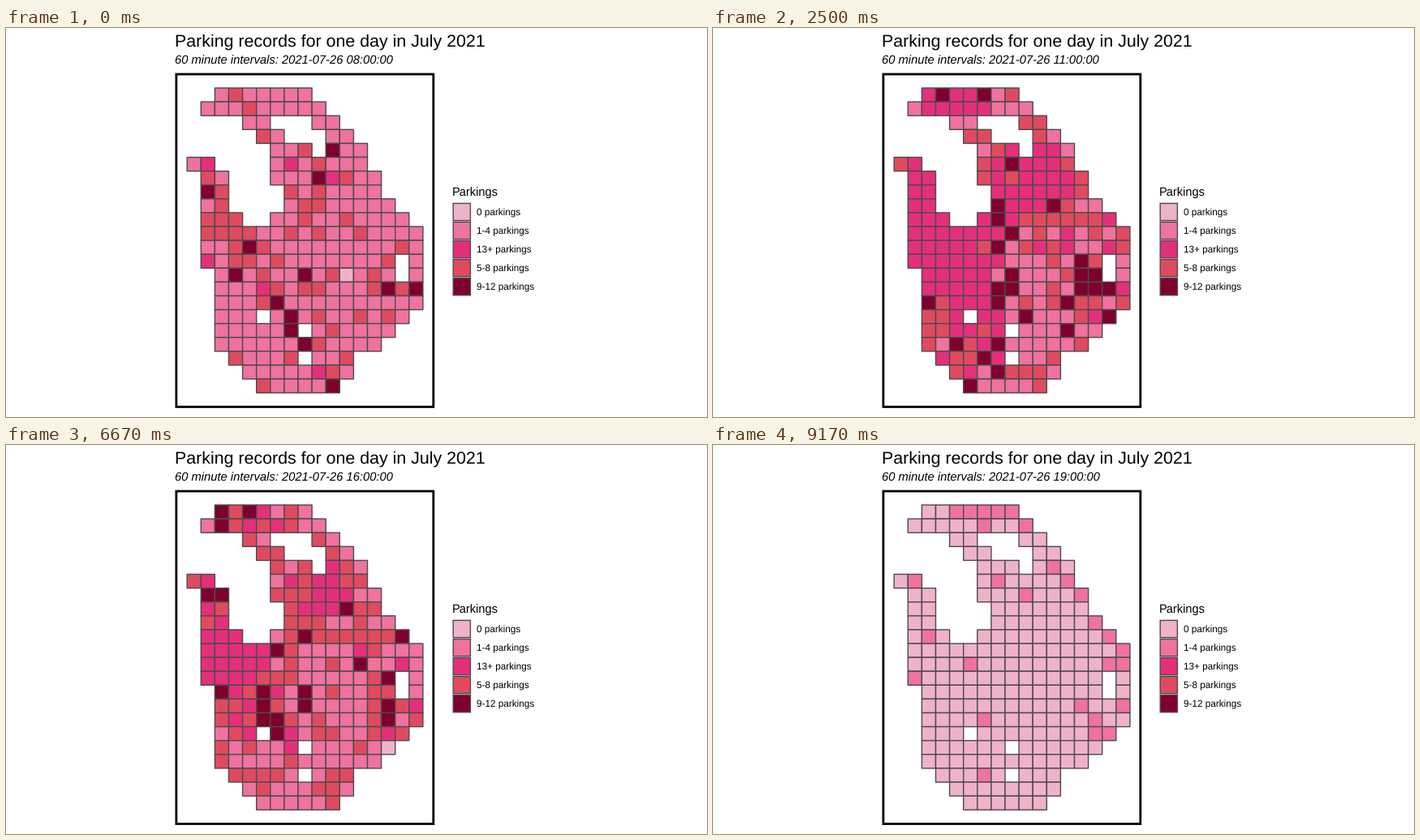
These frames come from a looping animation (864x480 px, 10 s). A matplotlib script:

```python
import numpy as np
import matplotlib.pyplot as plt
from matplotlib.animation import FuncAnimation
from matplotlib.collections import PolyCollection
from matplotlib.patches import Rectangle
from matplotlib.path import Path

WIDTH, HEIGHT, DPI = 864, 480, 96
LOOP_MS, TICK_MS = 10000, 25
TICKS = LOOP_MS // TICK_MS
FIRST_HOUR, HOURS = 8, 12
PX = 72 / DPI
LEFT, TOP, STEP = 223.2, 74.0, 17.1
EDGE = "#4f4a4d"

# Legend order is alphabetical, as the classes are plain text labels.
CLASSES = {
    "0 parkings": "#eeb3ca",
    "1-4 parkings": "#ef729f",
    "13+ parkings": "#e42f7b",
    "5-8 parkings": "#e04a5f",
    "9-12 parkings": "#7e002d",
}
BY_COUNT = ["0 parkings", "1-4 parkings", "5-8 parkings", "9-12 parkings", "13+ parkings"]
LIMITS = [0.5, 4.5, 8.5, 12.5]

# Coastline and inlet in units of cells; a cell is land if its centre is inside.
COAST = Path([
    (8.3, -.3), (12.5, 4.5), (13.5, 7.3), (16.4, 9.8), (16.4, 15.2), (13.4, 18.2),
    (11.6, 18.6), (11.3, 20.4), (10.5, 21.3), (4.7, 21.3), (1.6, 18.3), (1.6, 12.6),
    (.6, 12.4), (.6, 5.5), (-.4, 5.4), (-.4, 4.6), (1.4, 4.6), (2.4, 5.6), (2.4, 8.4),
    (3.4, 8.6), (3.4, 9.5), (5.6, 9.5), (5.6, 8.6), (6.6, 8.4), (6.6, 6.5), (5.4, 6.4),
    (5.4, 3.6), (3.4, 1.5), (.6, 1.5), (.6, .6), (1.6, -.3)])
INLET = Path([(5.1, 1.6), (8.3, 1.6), (9.9, 4.4), (8.6, 4.4)])
PONDS = [(15, 12), (15, 13), (5, 16), (8, 17), (8, 19)]

# Busy and calm districts: column, row, column spread, row spread, gain.
DISTRICTS = [
    (3, 11.7, 3, 3.2, 3), (4, 0.6, 2.6, 0.9, 2.6), (1.2, 7, 1.3, 3, 2.2),
    (9.6, 6, 2.7, 2.4, 2.7), (4.6, 18, 2, 2.4, 1.4), (14, 15, 2, 2.4, 0.7),
    (7.4, 0.9, 0.8, 0.7, -1.8), (5, 2, 0.9, 0.4, -2.5),
    (9.3, 13.3, 1.3, 1, -1), (10.5, 18.3, 1.3, 1.2, -1.3),
]
EVENING_SPOTS = [(14.3, 15.5, 1.6, 1.6, 2.4), (5, 0, 3.5, 0.7, 2.2)]


def is_land(cell):
    return (COAST.contains_point(cell) and not INLET.contains_point(cell)
            and cell not in PONDS)


cells = np.array([(c, r) for r in range(22) for c in range(17) if is_land((c, r))])
col, row = cells.T


def bumps(spots):
    return sum(gain * np.exp(-((col - c) / dc) ** 2 - ((row - r) / dr) ** 2)
               for c, r, dc, dr, gain in spots)


rng = np.random.default_rng(2021)
cell_noise = rng.normal(0, 0.5, len(cells))
hour_noise = rng.normal(0, 0.4, (HOURS, len(cells)))
districts = bumps(DISTRICTS)
east_rim = 1.9 * np.exp(-(col - 9 - 0.68 * row) ** 2 / 1.1) * (row < 12)
evening_spots = east_rim + bumps(EVENING_SPOTS)


def cell_colors(step):
    """Log-normal counts: quiet morning, busy day, empty evening."""
    hour = FIRST_HOUR + step
    key_hours = [8, 9, 15, 17, 19]
    level = np.interp(hour, key_hours, [1.05, 1.65, 1.5, 1.2, -1.7])
    contrast = np.interp(hour, key_hours, [0.15, 1, 0.8, 0.45, 0])
    evening = np.interp(hour, [17, 19], [0, 1])
    log_count = level + contrast * districts + evening * evening_spots
    log_count += cell_noise + hour_noise[step]
    return [CLASSES[BY_COUNT[k]] for k in np.digitize(np.exp(log_count), LIMITS)]


plt.rcParams["font.family"] = "Liberation Sans"
plt.rcParams["text.hinting"] = "none"
fig = plt.figure(figsize=(WIDTH / DPI, HEIGHT / DPI), dpi=DPI, facecolor="white")
ax = fig.add_axes([0, 0, 1, 1])
ax.set(xlim=(0, WIDTH), ylim=(HEIGHT, 0))
ax.axis("off")


def label(x, baseline, text, size, **style):
    return ax.text(x, baseline, text, fontsize=size * PX, va="baseline", **style)


def box(x, y, w, h, face, edge, line):
    ax.add_patch(Rectangle((x, y), w, h, facecolor=face, edgecolor=edge,
                           linewidth=line * PX, joinstyle="miter", snap=False))


label(208.3, 23, "Parking records for one day in July 2021", 21.4)
subtitle = label(208.3, 45.3, "", 14.72, style="italic")
box(209.9, 57, 316.9, 410.5, "none", "black", 2.8)

label(550, 207, "Parkings", 14.67)
for i, (name, color) in enumerate(CLASSES.items()):
    middle = 227 + 23.04 * i
    box(551.2, middle - 10.6, 21.2, 21.2, color, EDGE, 1.42)
    label(580.3, middle + 4.2, name, 11.73)

corners = np.array([(0, 0), (1, 0), (1, 1), (0, 1)])
squares = (cells[:, None] + corners) * STEP + (LEFT, TOP)
tiles = PolyCollection(squares, edgecolors=EDGE, linewidths=1.42 * PX, snap=False)
ax.add_collection(tiles, autolim=False)


def update(tick):
    # Each hour begins on the last tick at or before its exact share of the loop.
    step = ((tick + 1) * HOURS - 1) // TICKS
    tiles.set_facecolor(cell_colors(step))
    subtitle.set_text(f"60 minute intervals: 2021-07-26 {FIRST_HOUR + step:02d}:00:00")
    return tiles, subtitle


animation = FuncAnimation(fig, update, frames=TICKS, interval=TICK_MS,
                          repeat=True, repeat_delay=0)
plt.show()
```
